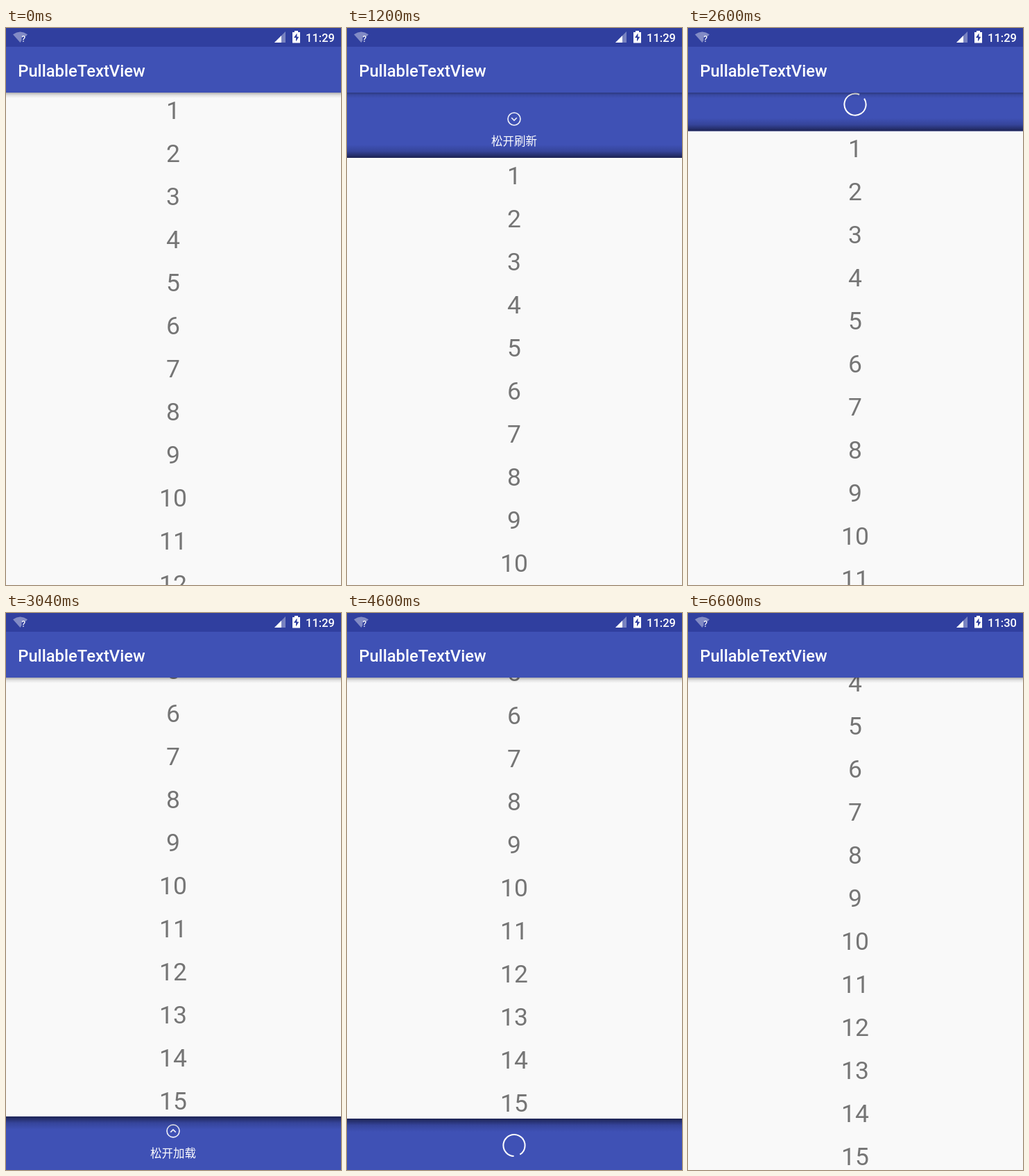
An HTML page for the animation above (7240 ms loop, 483x802 px).

```html
<!DOCTYPE html>
<html lang="zh-CN">
<head>
<meta charset="utf-8">
<title>PullableTextView</title>
<style>
  html, body { margin: 0; width: 100%; height: 100%; overflow: hidden; background: #3f51b5; }
  svg { display: block; width: 100vw; height: 100vh; }
  text { font-family: Roboto, sans-serif; }
  .row { font-size: 35.4px; fill: #757575; text-anchor: middle; }
  .bar { font-weight: 500; fill: #fff; }
  .hint { font: 16.5px "Noto Sans CJK SC", "Noto Sans CJK", sans-serif; fill: #fff; text-anchor: middle; }
  .line { fill: none; stroke: #fff; stroke-width: 2; }
  .thin { stroke-width: 1.6; stroke-opacity: .92; }
</style>
</head>
<body>
<svg viewBox="0 0 483 802">
  <defs>
    <linearGradient id="edge" x2="0" y2="1">
      <stop offset="0" stop-color="#14183c" stop-opacity="0"/>
      <stop offset=".5" stop-color="#14183c" stop-opacity=".22"/>
      <stop offset="1" stop-color="#14183c" stop-opacity=".82"/>
    </linearGradient>
    <linearGradient id="drop" x2="0" y2="1">
      <stop offset="0" stop-opacity=".3"/>
      <stop offset=".45" stop-opacity=".1"/>
      <stop offset="1" stop-opacity="0"/>
    </linearGradient>
    <g id="arrow" class="line thin">
      <circle r="9"/>
      <path d="M-3.8-1.8L0 2L3.8-1.8"/>
    </g>
  </defs>
  <rect width="483" height="802" fill="#3f51b5"/>
  <g id="header"></g>
  <g id="footer"></g>
  <g id="list"></g>
  <rect y="93" width="483" height="8" fill="url(#drop)"/>
  <rect y="27" width="483" height="66" fill="#3f51b5"/>
  <rect width="483" height="27" fill="#303f9f"/>
  <text class="bar" x="17.2" y="69.5" font-size="23.75">PullableTextView</text>
  <g fill="#fff">
    <path d="M10 9.2Q20.5 1.8 31 9.2L28.5 12H22.5V18L20.5 21Z" opacity=".4"/>
    <text class="bar" x="22.3" y="20" font-size="12">?</text>
    <path d="M387 21L403 5V21Z" opacity=".35"/>
    <path d="M387 21L397 11V21Z"/>
    <path d="M413 6H416V4H421V6H424V21.5H413Z"/>
  </g>
  <path d="M419.5 7.5L415 14H418V19.5L422.3 12.7H419.5Z" fill="#303f9f"/>
  <text class="bar" id="clock" x="474" y="19.8" font-size="16.5" text-anchor="end"></text>
</svg>
<script>
const LOOP = 7240, STEP = 40, CENTER = 241;
const LIST_TOP = 93, LIST_HEIGHT = 916, ROWS = 15, ROW_GAP = 62;
const $ = id => document.getElementById(id);
const clamp = v => Math.max(0, Math.min(1, v));
const ramp = (t, from, to) => clamp((t - from) / (to - from));

const linear = p => p;
const easeIn = p => p * p;
const easeOut = p => 1 - (1 - p) ** 2;

// [time, list offset, easing of the way there]
const track = [
  [0, 0], [440, 0], [600, -24, easeOut], [760, -24], [1200, 94, linear],
  [1480, 112, easeOut], [1560, 112], [1800, 77.5, easeOut], [2480, 77.5],
  [2600, 55.6, easeIn], [2800, -100, linear], [3080, -288, easeOut],
  [3260, -304, easeOut], [3300, -304], [3500, -281, easeOut], [6400, -281],
  [6600, -204, easeOut], [LOOP, -204]
];

function offsetAt(t) {
  const i = track.findIndex(key => key[0] > t);
  const [t0, v0] = track[i - 1], [t1, v1, ease = linear] = track[i];
  return v0 + (v1 - v0) * ease(ramp(t, t0, t1));
}

function makePanel(id, shadow) {
  $(id).innerHTML = `
    <g class="label"><use href="#arrow"/><text class="hint" x="${CENTER}" y="59"></text></g>
    <circle class="ring line" r="15.6" pathLength="360"/>
    <rect width="483" height="19" fill="url(#edge)" transform="${shadow}"/>`;
  const find = s => $(id).querySelector(s);
  return { root: $(id), label: find(".label"), arrow: find("use"), text: find("text"), ring: find(".ring") };
}

function drawPanel(panel, y, s) {
  panel.root.setAttribute("transform", `translate(0 ${y})`);
  panel.label.setAttribute("opacity", 1 - ramp(s.sinceRelease, 0, 260));
  panel.arrow.setAttribute("transform", `translate(${CENTER} 21) rotate(${s.turn})`);
  panel.text.textContent = s.text;
  panel.ring.setAttribute("opacity", ramp(s.sinceRelease, 80, 320));
  panel.ring.setAttribute("stroke-dasharray", `${360 - s.gap} ${s.gap}`);
  panel.ring.setAttribute("transform",
    `translate(${CENTER} 38.5) rotate(${s.gapAngle - 90 + s.gap / 2}) scale(${s.scale})`);
}

const header = makePanel("header", "translate(0 58)");
const footer = makePanel("footer", "translate(0 19) scale(1 -1)");

$("list").innerHTML = `<rect y="${LIST_TOP}" width="483" height="${LIST_HEIGHT}" fill="#f9f9f9"/>` +
  Array.from({ length: ROWS }, (_, i) =>
    `<text class="row" x="${CENTER}" y="${130.7 + i * ROW_GAP}">${i + 1}</text>`).join("");

const hint = (t, ready, release, names) => names[t >= release ? 2 : t >= ready ? 1 : 0];
const spin = (t, origin) => (t - origin) / 700 * 360 % 360;

function draw(t) {
  const offset = offsetAt(t);
  $("list").setAttribute("transform", `translate(0 ${offset})`);
  $("clock").textContent = t < 5880 ? "11:29" : "11:30";

  drawPanel(header, LIST_TOP + offset - 77, {
    sinceRelease: t - 1600,
    turn: 180 * ramp(t, 1200, 1360),
    text: hint(t, 1160, 1600, ["下拉刷新", "松开刷新", "正在刷新"]),
    gap: 34, gapAngle: 40 + spin(t, 2600), scale: 1
  });

  const done = ramp(t, 5960, 6200);
  drawPanel(footer, LIST_TOP + LIST_HEIGHT + offset, {
    sinceRelease: t - 3300,
    turn: 180 + 180 * ramp(t, 3060, 3220),
    text: hint(t, 3040, 3300, ["上拉加载", "松开加载", "正在加载"]),
    gap: 34 * (1 - done), gapAngle: spin(t, 5680),
    scale: 1 + .23 * Math.sin(Math.PI * done)
  });
}

const start = performance.now();
function tick() {
  const t = (performance.now() - start) % LOOP;
  draw(Math.floor(t / STEP) * STEP);
  requestAnimationFrame(tick);
}
tick();
</script>
</body>
</html>
```
